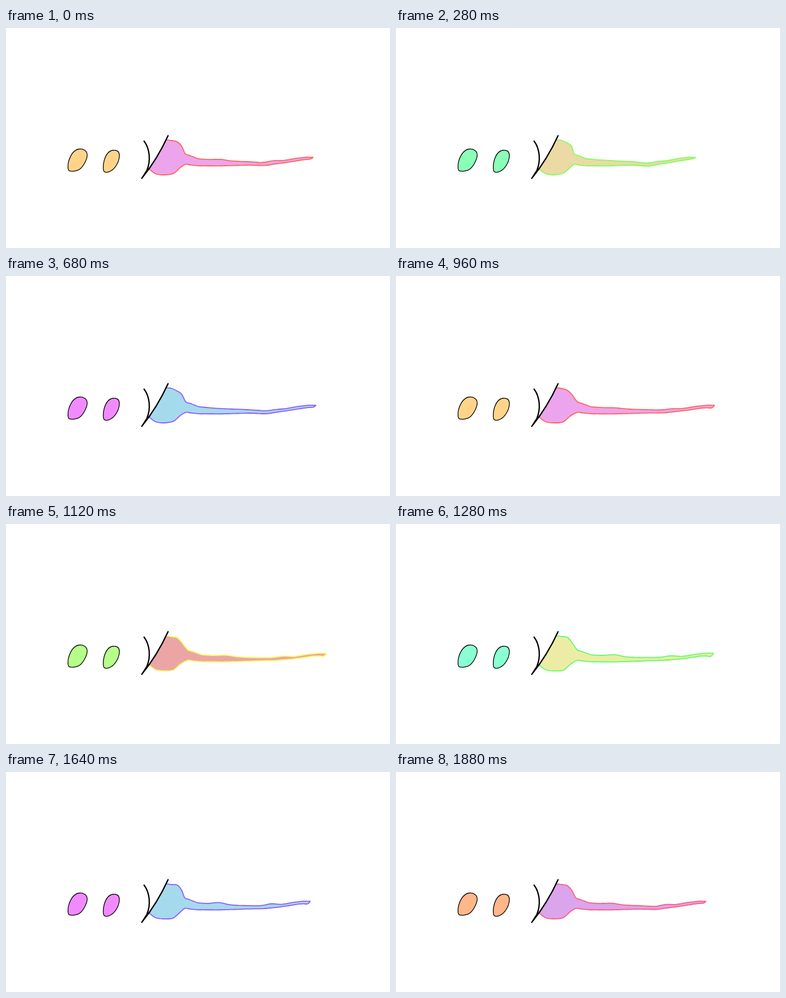
These frames come from a looping animation (673x385 px, 1920 ms). An HTML page with a canvas:

```html
<!DOCTYPE html>
<html lang="en">
<head>
<meta charset="utf-8">
<style>
html, body { margin: 0; width: 100%; height: 100%; overflow: hidden; background: #fff; }
canvas { display: block; }
</style>
</head>
<body>
<canvas id="stage" width="673" height="385"></canvas>
<script>
const ctx = document.getElementById('stage').getContext('2d');
const LOOP = 1920, STEP = 40, HUE_CYCLE = 960;

// Tail edges at rest: [share of the way from neck to tip, y]
const UPPER = [[0, 220], [.045, 224], [.1, 228.8], [.25, 232], [.5, 234], [.61, 235.2],
  [.77, 232], [.86, 228.3], [.95, 226], [1, 226.5]];
const LOWER = [[0, 238.6], [.1, 241.2], [.27, 241.3], [.5, 239.8], [.62, 240.3],
  [.78, 235.7], [.93, 230.5]];

// Where the tip turns: [ms, x]
const TIP = [[0, 538], [280, 525], [480, 551], [680, 543], [1080, 562], [1280, 556],
  [1640, 533], [1880, 543], [LOOP, 538]];

const EYES = [
  [[108.6, 242], [110.5, 231], [117, 218.5], [127, 212], [138, 214], [142.3, 222],
    [138.5, 235], [130, 246.5], [120, 250.3], [110.5, 249.5]],
  [[170.5, 246], [172, 232], [178, 219.5], [187, 214], [196.8, 216.5], [198.3, 228],
    [193, 241], [184, 250], [173.5, 252.2]]
];

const linear = k => k;
const smooth = k => k * k * (3 - 2 * k);
const wave = (t, peak) => Math.cos((t - peak) / LOOP * 2 * Math.PI);
const bell = (u, mid, width) => Math.exp(-(((u - mid) / width) ** 2));

function between(keys, x, ease) {
  const i = Math.max(1, keys.findIndex(key => key[0] >= x));
  const [a, b] = [keys[i - 1], keys[i]];
  return a[1] + (b[1] - a[1]) * ease((x - a[0]) / (b[0] - a[0]));
}

// Smooth curve through all points
function trace(pts, closed) {
  const n = pts.length;
  const at = i => closed ? pts[(i + n) % n] : pts[Math.max(0, Math.min(n - 1, i))];
  ctx.beginPath();
  ctx.moveTo(...pts[0]);
  for (let i = 0; i < (closed ? n : n - 1); i++) {
    const [p, a, b, q] = [at(i - 1), at(i), at(i + 1), at(i + 2)];
    ctx.bezierCurveTo(
      a[0] + (b[0] - p[0]) / 6, a[1] + (b[1] - p[1]) / 6,
      b[0] - (q[0] - a[0]) / 6, b[1] - (q[1] - a[1]) / 6, b[0], b[1]);
  }
}

function paint(fill, stroke, width) {
  ctx.fillStyle = fill;
  ctx.fill();
  ctx.strokeStyle = stroke;
  ctx.lineWidth = width;
  ctx.stroke();
}

function blobPoints(t) {
  const tip = between(TIP, t, smooth);
  const neck = 315 + .18 * (tip - 543);
  const ripple = (1 + wave(t, 1500)) / 2;
  const sag = wave(t, 380);
  const lower = [...LOWER, [1, 230 + 2.3 * wave(t, 1280)]];

  const top = [], low = [];
  for (let u = 0; u < .99; u += .035) {
    const x = neck + (tip - neck) * u;
    const dip = 1.5 * sag * bell(u, .61, .09);
    const bumps = 4 * bell(u, .27, .065) + 2.8 * bell(u, .69, .055);
    top.push([x, between(UPPER, u, linear) + dip - ripple * bumps]);
    low.unshift([x, between(lower, u, linear) + dip]);
  }
  return [
    [281, 195.5], [291, 197], [300, 201.5 - 4 * ripple], [308, 207],
    ...top, [tip, 226.5], ...low,
    [305, 245 - sag], [293, 255 - sag], [276, 257], [262, 255], [251, 247]
  ];
}

function draw(t) {
  const turn = t / HUE_CYCLE * 360;
  const color = (hue, sat, light) => `hsl(${(hue + turn) % 360}, ${sat}%, ${light}%)`;
  ctx.fillStyle = '#fff';
  ctx.fillRect(0, 0, 673, 385);

  for (const eye of EYES) {
    trace(eye, true);
    paint(color(38, 100, 77), '#000', 1.3);
  }

  trace(blobPoints(t), false);
  paint(color(300, 65, 78.5), color(3, 100, 68), 1.8);

  ctx.strokeStyle = '#000';
  ctx.lineWidth = 2.3;
  ctx.beginPath();
  ctx.moveTo(284, 188.5);
  ctx.quadraticCurveTo(265, 230, 238, 263);
  ctx.moveTo(242, 198);
  ctx.bezierCurveTo(252, 211, 254, 232, 247, 249);
  ctx.lineTo(238, 263);
  ctx.stroke();
}

ctx.lineCap = ctx.lineJoin = 'round';
const start = performance.now();
function tick() {
  const t = (performance.now() - start) % LOOP;
  draw(Math.floor(t / STEP) * STEP);
  requestAnimationFrame(tick);
}
tick();
</script>
</body>
</html>
```
